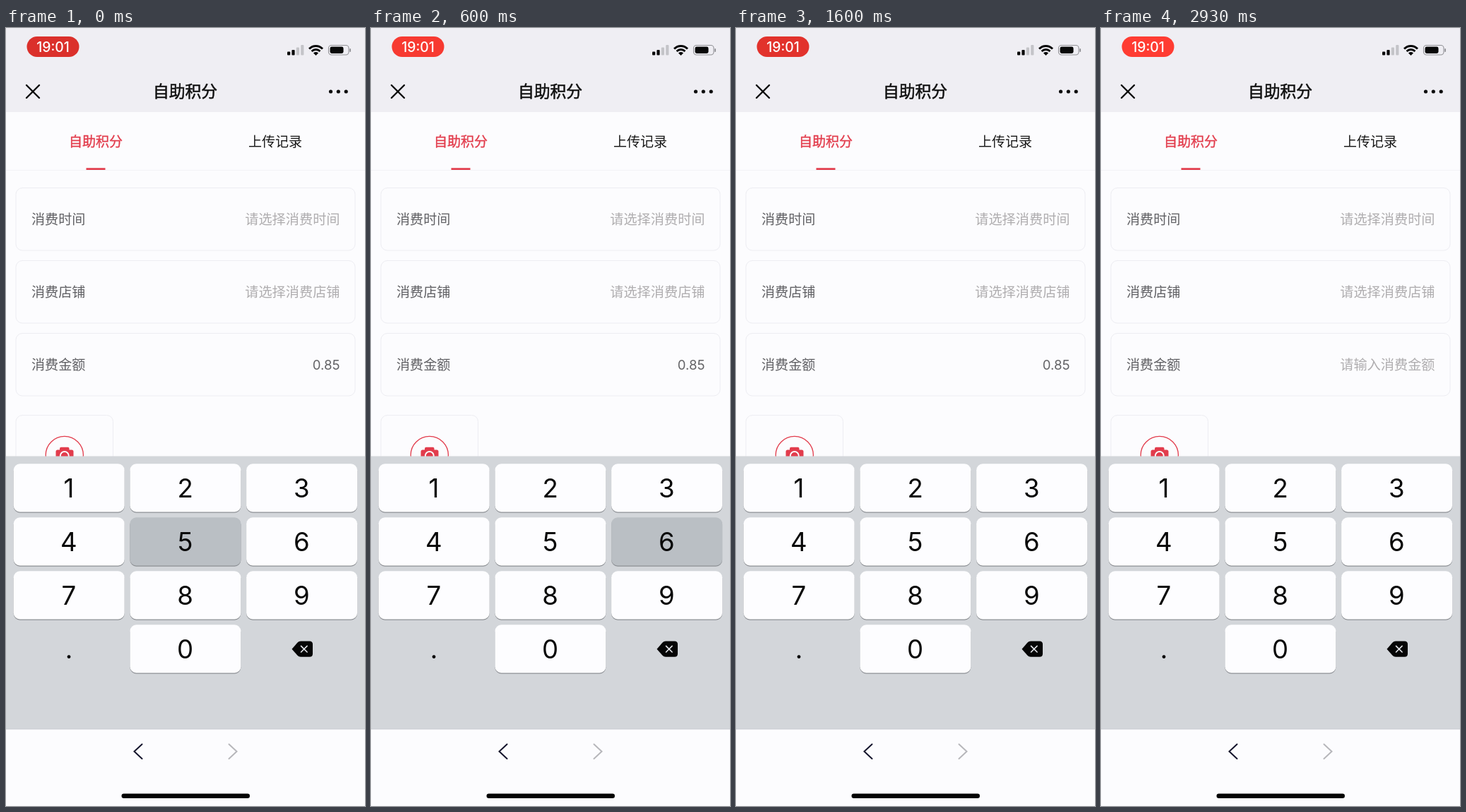
These frames come from a looping animation (508 by 1102 pixels, 2.99 s). An HTML page with a canvas:

```html
<!DOCTYPE html>
<html lang="zh-CN">
<head>
<meta charset="utf-8">
<title>自助积分</title>
<style>
html, body { margin: 0; width: 100%; height: 100%; overflow: hidden; background: #fcfcfe; }
canvas { display: block; width: 508px; height: 1102px; }
</style>
</head>
<body>
<canvas id="stage"></canvas>
<script>
const W = 508, H = 1102, LOOP = 2990;
const CJK = '"Noto Sans CJK SC", "Noto Sans CJK", sans-serif';
const LATIN = 'Inter, Roboto, sans-serif';
const RED = '#e23c4c', PAGE = '#fcfcfe';
const canvas = document.getElementById('stage');
const c = canvas.getContext('2d');
const dpr = window.devicePixelRatio || 1;
canvas.width = W * dpr;
canvas.height = H * dpr;

// [start, end, key]
const presses = [[0, 130, '5'], [200, 670, '6']];
// [start, field content]
const edits = [[0, '0.85'], [1730, '0.8'], [1930, '0.'], [2130, '0'], [2330, '']];

function rect(x, y, w, h, color) {
  c.fillStyle = color;
  c.fillRect(x, y, w, h);
}

function round(x, y, w, h, r, fill, stroke, lw = 1) {
  c.beginPath();
  c.roundRect(x, y, w, h, r);
  if (fill) { c.fillStyle = fill; c.fill(); }
  if (stroke) { c.strokeStyle = stroke; c.lineWidth = lw; c.stroke(); }
}

function disc(x, y, r, color) {
  c.beginPath();
  c.arc(x, y, r, 0, Math.PI * 2);
  c.fillStyle = color;
  c.fill();
}

function ring(x, y, r, color, width) {
  c.beginPath();
  c.arc(x, y, r, 0, Math.PI * 2);
  c.strokeStyle = color;
  c.lineWidth = width;
  c.stroke();
}

function line(points, color, width) {
  c.beginPath();
  points.forEach(([x, y], i) => i ? c.lineTo(x, y) : c.moveTo(x, y));
  c.strokeStyle = color;
  c.lineWidth = width;
  c.lineCap = 'round';
  c.lineJoin = 'miter';
  c.stroke();
}

function cross(x, y, r, color, width) {
  line([[x - r, y - r], [x + r, y + r]], color, width);
  line([[x + r, y - r], [x - r, y + r]], color, width);
}

// Text centred vertically on cy; bold adds a thin outline for a medium weight
function text(str, x, cy, size, color, { align = 'center', weight = 400, family = CJK, bold = 0 } = {}) {
  const y = cy + size * (family === CJK ? 0.38 : 0.364);
  c.font = `${weight} ${size}px ${family}`;
  c.textAlign = align;
  c.textBaseline = 'alphabetic';
  c.fillStyle = color;
  c.fillText(str, x, y);
  if (bold) {
    c.strokeStyle = color;
    c.lineWidth = bold;
    c.lineJoin = 'round';
    c.strokeText(str, x, y);
  }
}

function statusBar(t) {
  const glow = 0.5 - 0.5 * Math.cos((t + 100) / 2000 * Math.PI * 2);
  const mix = (a, b) => Math.round(a + (b - a) * glow);
  round(29.5, 12, 74, 29, 14.5, `rgb(${mix(218, 255)},${mix(48, 60)},${mix(43, 50)})`);
  text('19:01', 66.5, 26.5, 19.4, '#fff', { weight: 500, family: LATIN });

  [5, 7.5, 11, 14.5].forEach((h, i) =>
    round(398 + i * 6.4, 38.5 - h, 4.2, h, 1, i < 2 ? '#080808' : '#c4c4c8'));

  c.save();
  c.beginPath();
  c.moveTo(438.5, 39);
  c.lineTo(424.5, 25);
  c.lineTo(424.5, 18);
  c.lineTo(452.5, 18);
  c.lineTo(452.5, 25);
  c.closePath();
  c.clip();
  disc(438.5, 38.5, 4.6, '#080808');
  for (const r of [8, 13]) ring(438.5, 38.5, r, '#080808', 2.9);
  c.restore();

  round(456.5, 24.5, 28.5, 13.5, 4, null, '#929296', 1.1);
  round(458.5, 26.5, 19, 9.5, 2.4, '#080808');
  round(486.2, 29, 1.8, 5, 0.9, '#929296');
}

function header(t) {
  rect(0, 0, W, 119, '#efeef3');
  statusBar(t);
  cross(38, 90, 9, '#0c0c0c', 2.4);
  text('自助积分', 253.5, 89.8, 22.8, '#101010', { weight: 500, bold: 0.5 });
  for (const x of [459.5, 470.3, 481.2]) disc(x, 90, 2.6, '#0c0c0c');
}

function tabs() {
  text('自助积分', 127, 160.5, 19, RED, { weight: 500, bold: 0.35 });
  text('上传记录', 381, 160.5, 19, '#181818');
  rect(113.5, 198.3, 27, 2.7, RED);
  rect(0, 201, W, 1, '#f3f3f6');
}

function field(y, label, value, hint) {
  round(14, y + 0.5, 480, 88.5, 9, null, '#ededf2');
  text(label, 36, y + 44.5, 19.1, '#606064', { align: 'left' });
  if (value) text(value, 472.5, y + 44.8, 18.6, '#636366', { align: 'right', family: LATIN });
  else text(hint, 472.5, y + 44.5, 19.2, '#afadaf', { align: 'right' });
}

function photoBox() {
  round(14, 548.5, 137.5, 138, 9, null, '#ededf2');
  ring(82.8, 605, 26.6, RED, 1.3);
  round(70.5, 597.5, 25, 18, 2.5, RED);
  round(76, 593.7, 13.5, 7, 2, RED);
  ring(82.8, 606, 6, PAGE, 1.9);
}

function backspace() {
  c.beginPath();
  c.moveTo(404.5, 879.7);
  c.lineTo(412.5, 870.5);
  c.quadraticCurveTo(414.3, 868.5, 417, 868.5);
  c.lineTo(429.5, 868.5);
  c.quadraticCurveTo(434, 868.5, 434, 873);
  c.lineTo(434, 886.3);
  c.quadraticCurveTo(434, 890.8, 429.5, 890.8);
  c.lineTo(417, 890.8);
  c.quadraticCurveTo(414.3, 890.8, 412.5, 888.8);
  c.closePath();
  c.fillStyle = '#050505';
  c.fill();
  cross(421.8, 879.7, 4.3, '#e4e6ea', 1.6);
}

function keypad(pressed) {
  rect(0, 606.5, W, 386.5, '#d3d6da');
  [...'123456789.0'].forEach((key, i) => {
    const x = 10.7 + (i % 3) * 164.7, y = 617.3 + Math.floor(i / 3) * 76;
    if (key !== '.') {
      round(x, y + 1.2, 157, 68.2, 9, '#8d9094');
      round(x, y, 157, 68.2, 9, key === pressed ? '#babfc4' : '#fdfdff');
    }
    text(key, x + 78.2, y + 34.7, 36.6, '#080808', { family: LATIN });
  });
  backspace();
}

function chevron(x, dir, color) {
  line([[x + dir * 5.5, 1014.5], [x - dir * 5.5, 1024.7], [x + dir * 5.5, 1035]], color, 2);
}

function toolbar() {
  rect(0, 993, W, 109, PAGE);
  rect(0, 992.5, W, 1, '#c9ccd1');
  chevron(187, 1, '#14142c');
  chevron(321, -1, '#b7b7bb');
  round(163.5, 1084.5, 181.5, 6.5, 3.25, '#050505');
}

function draw(t) {
  const press = presses.find(([a, b]) => t >= a && t < b);
  const value = edits.filter(([at]) => t >= at).pop()[1];
  c.setTransform(dpr, 0, 0, dpr, 0, 0);
  rect(0, 0, W, H, PAGE);
  header(t);
  tabs();
  field(226, '消费时间', '', '请选择消费时间');
  field(329, '消费店铺', '', '请选择消费店铺');
  field(432, '消费金额', value, '请输入消费金额');
  photoBox();
  keypad(press && press[2]);
  toolbar();
}

const start = performance.now();
function tick() {
  draw((performance.now() - start) % LOOP);
  requestAnimationFrame(tick);
}
tick();
</script>
</body>
</html>
```
